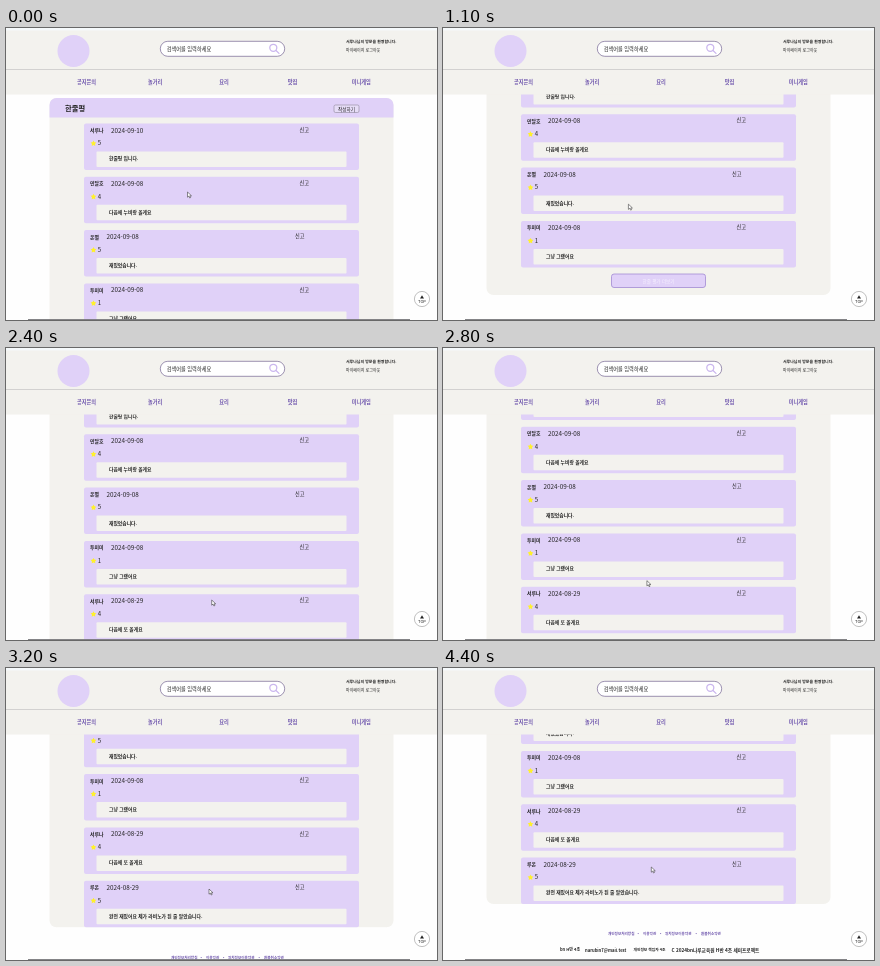
These frames come from a looping animation (431 by 292 pixels, 4800 ms). An HTML page:

```html
<!DOCTYPE html>
<html lang="ko">
<head>
<meta charset="utf-8">
<title>한줄평</title>
<style>
  html, body { margin: 0; width: 100%; height: 100%; overflow: hidden; background: #fefefe; }
  svg { display: block; width: 100%; height: 100%; }
  text { font-family: "Noto Sans CJK KR", "Noto Sans CJK", sans-serif; font-weight: 700; fill: #222; white-space: pre; }
  .plain { font-weight: 400; }
  .medium { font-weight: 500; }
  .purple { fill: #6e55ad; }
  .pale { fill: #f6f0ff; font-weight: 400; }
  .middle { text-anchor: middle; }
  .lavender { fill: #e0d1f8; }
  .beige { fill: #f3f2ee; }
</style>
</head>
<body>
<svg viewBox="0 0 431 292">
  <defs><clipPath id="view"><rect y="66" width="431" height="226"/></clipPath></defs>
  <rect width="431" height="292" fill="#fefefe"/>
  <g clip-path="url(#view)">
    <g id="page">
      <rect id="panel" class="beige" x="43.5" y="70" width="344" rx="7"/>
      <path class="lavender" d="M43.5 89.5V77a7 7 0 0 1 7-7h330a7 7 0 0 1 7 7v12.5z"/>
      <rect x="328" y="77" width="25" height="7.5" rx="1.5" fill="#e6dcf7" stroke="#8d8799" stroke-width=".6"/>
      <g id="cards"></g>
      <g id="more">
        <rect class="lavender" x="168.5" y="308.5" width="94" height="13.5" rx="2.5" stroke="#a38bd4" stroke-width=".8"/>
      </g>
      <g id="footer"></g>
    </g>
  </g>
  <g id="header">
    <rect class="beige" width="431" height="66.5"/>
    <rect width="431" height="2.5" fill="#f6fafc"/>
    <path d="M0 41.5H431" stroke="#cbc9c9" stroke-width=".8"/>
    <circle class="lavender" cx="67.5" cy="23" r="16"/>
    <rect x="154.3" y="13.3" width="124.4" height="15" rx="7.5" fill="#fff" stroke="#85779f" stroke-width=".8"/>
    <g fill="none" stroke="#cbb7ee" stroke-width="1.3" stroke-linecap="round">
      <circle cx="267.3" cy="19.8" r="3.5"/><path d="M270 22.5L273 25.4"/>
    </g>
  </g>
  <g id="top">
    <circle cx="416" cy="271" r="7.6" fill="#fff" stroke="#a5a5a5" stroke-width=".7"/>
    <path d="M416 267.2l2 3.4h-4z" fill="#222"/>
  </g>
  <path d="M22 291.5H404" stroke="#77767a" stroke-width=".9"/>
  <path id="cursor" d="M0 0V5.2L1.3 4.1L2.2 6L3.1 5.6L2.3 3.8H4z" fill="#fff" stroke="#333" stroke-width=".55"/>
</svg>
<script>
const $ = id => document.getElementById(id);

function add(parent, tag, attrs, content = '') {
  const node = document.createElementNS('http://www.w3.org/2000/svg', tag);
  for (const key in attrs) node.setAttribute(key, attrs[key]);
  node.textContent = content;
  return parent.appendChild(node);
}

// y is the vertical middle of the glyphs
function label(parent, content, x, y, size, cls = '') {
  return add(parent, 'text', { x, y: y + size * 0.37, 'font-size': size, class: cls }, content);
}

const reviews = [
  ['서루나', '2024-09-10', 5, '한줄평 입니다.'],
  ['민달호', '2024-09-08', 4, '다음에 누비랑 올게요'],
  ['온별', '2024-09-08', 5, '재밌었습니다.'],
  ['투미미', '2024-09-08', 1, '그냥 그랬어요'],
  ['서루나', '2024-08-29', 4, '다음에 또 올게요'],
  ['루온', '2024-08-29', 5, '완전 재밌어요 제가 라비노가 된 줄 알았습니다.']
];

const STAR = Array.from({ length: 10 }, (_, i) => {
  const r = i % 2 ? 1.6 : 3, a = (i / 5 - 0.5) * Math.PI;
  return `${87.5 + r * Math.cos(a)},${20 + r * Math.sin(a)}`;
}).join(' ');

const cards = reviews.map(([name, date, score, comment], i) => {
  const card = add($('cards'), 'g', { transform: `translate(0 ${95.5 + i * 53.3})` });
  const shift = name.length < 3 ? -4.5 : 0;
  add(card, 'rect', { x: 78, width: 275, height: 46.5, rx: 2, class: 'lavender' });
  add(card, 'rect', { x: 90.5, y: 28, width: 250, height: 15.5, rx: 1, class: 'beige' });
  add(card, 'polygon', { points: STAR, fill: '#fff12b' });
  label(card, name, 84, 6.7, 4.9);
  label(card, date, 105 + shift, 6.7, 6.3, 'medium');
  label(card, '신고', 293.5 + shift, 6.2, 5.2, 'medium');
  label(card, score, 91.8, 19.6, 6, 'medium');
  label(card, comment, 103, 35.2, 4.8);
  return card;
});

label($('page'), '한줄평', 59, 80.5, 7.3);
label($('page'), '작성하기', 340.5, 80.8, 4.6, 'plain middle');
label($('more'), '한줄 평가 더보기', 215.5, 315.3, 4.6, 'pale middle');

['공지문의', '놀거리', '요리', '맛집', '미니게임'].forEach((item, i) =>
  label($('header'), item, 80.5 + i * 68.7, 54, 5.2, 'purple middle'));
label($('header'), '검색어를 입력하세요', 160.8, 20.8, 5.2, 'medium');
label($('header'), '서루나님의 방문을 환영합니다.', 340, 14, 3.95);
label($('header'), '마이페이지 로그아웃', 340, 23, 4, 'plain');
label($('top'), 'TOP', 416, 274, 4, 'plain middle');

[['개인정보처리방침', 165], ['•', 194.5], ['이용약관', 200], ['•', 217], ['위치정보이용약관', 222],
 ['•', 252.5], ['환불취소약관', 258]].forEach(([s, x]) => label($('footer'), s, x, 30, 3.6, 'purple'));
[['bn H반 4조', 117, 4], ['narubin7@mail.test', 142, 4.2], ['개인정보 책임자 4조', 190.5, 3.75],
 ['C 2024bn나루교육원 H반 4조 세미프로젝트', 228.5, 4.7]].forEach(([s, x, size]) => label($('footer'), s, x, 46, size));

const LOOP = 4800, STEP = 100, EXPAND_AT = 2200;
const scrollKeys = [[300, 0], [400, 7], [500, 18], [600, 31], [800, 52], [1000, 62.5], [2700, 62.5],
  [2800, 70], [3000, 118], [3200, 149.3], [3400, 168], [3500, 172.5]];
const cursorKeys = [[1000, 181.5, 164], [1600, 205, 237], [2100, 205, 253], [2400, 205.7, 252],
  [3000, 203, 223], [3200, 203, 221], [3900, 203, 200], [4200, 206, 197], [4400, 208.3, 199]];

function sample(keys, t) {
  const next = keys.findIndex(key => key[0] > t);
  if (next === 0) return keys[0].slice(1);
  if (next < 0) return keys[keys.length - 1].slice(1);
  const a = keys[next - 1], b = keys[next], p = (t - a[0]) / (b[0] - a[0]);
  return a.slice(1).map((v, i) => v + (b[i + 1] - v) * p);
}

function render(now) {
  const t = Math.floor(now % LOOP / STEP) * STEP;
  const expanded = t >= EXPAND_AT, bottom = expanded ? 408.5 : 329.5;
  const [scroll] = sample(scrollKeys, t);
  $('page').setAttribute('transform', `translate(0 ${-scroll})`);
  $('cursor').setAttribute('transform', `translate(${sample(cursorKeys, t)})`);
  $('panel').setAttribute('height', bottom - 70);
  $('footer').setAttribute('transform', `translate(0 ${bottom})`);
  $('more').style.display = expanded ? 'none' : '';
  cards.slice(4).forEach(card => card.style.display = expanded ? '' : 'none');
}

const start = performance.now();
(function tick() {
  render(performance.now() - start);
  requestAnimationFrame(tick);
})();
</script>
</body>
</html>
```
